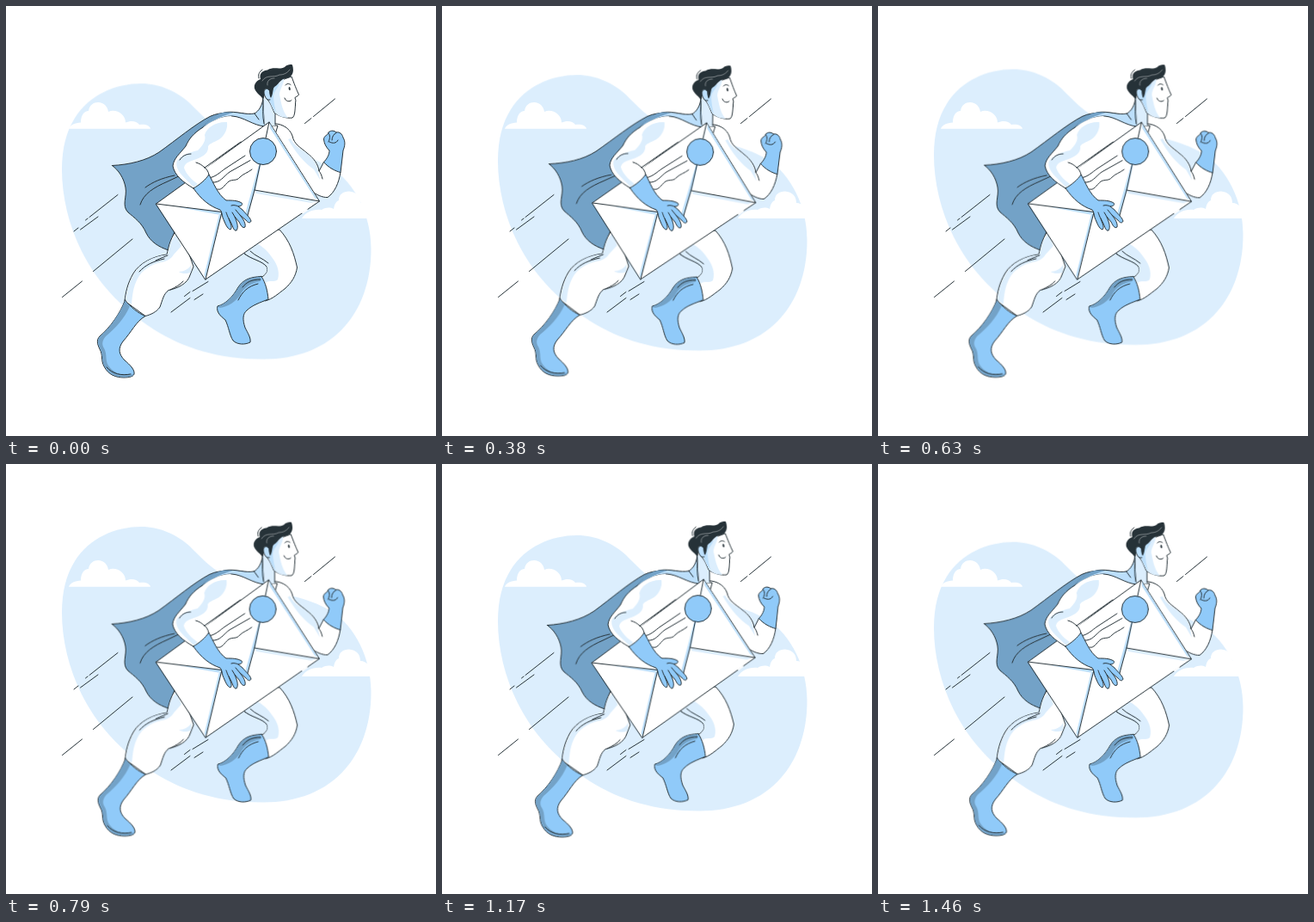
These frames come from a looping animation (500 by 500 pixels, 1500 ms). An HTML page:

```html
<!DOCTYPE html>
<html lang="en">
<head>
<meta charset="utf-8">
<title>Special delivery</title>
<style>
  html, body { margin: 0; width: 100%; height: 100%; overflow: hidden; background: #fff; }
  svg { display: block; width: 100%; height: 100%; }
  path, circle { stroke-linecap: round; stroke-linejoin: round; }
  .pale { fill: #dceefd; }
  .soft { fill: #bcdffb; }
  .blue { fill: #90caf9; }
  .deep { fill: #73a2c7; }
  .white { fill: #fff; }
  .ink { fill: #263238; }
  .line { fill: none; }
  .line, .edge { stroke: #263238; stroke-width: 1; }
  #hero { transform-origin: 249px 251px; }
</style>
</head>
<body>
<svg viewBox="0 0 500 500">
  <path id="blob" class="pale" d="M157 91C180 91 200 101 214 114C231 131 244 146 275 157C310 167 350 172 378 189C406 206 424.5 245 424.500 282C425 323 411 354 395 372C372 399 338 411.500 299 411.500C248 411.500 207 399 172 377C132 351 105 320 88 286C73 256 65 222 65 191C65 166 70 147 80 131C97 104 127 91 157 91Z"/>

  <g class="white">
    <path d="M73 142.700C75 138 80 136 87 135.500C87 127 91 122 96 122C97 115 102 112 107 112C114 112 118 117 119 123C128 119 139 126 139 135.500C146 132.500 152 134 155 138C162 137 167 139 168 142.700Z"/>
    <path d="M344 247C348 240 357 236 367 237C372 234 377 234 381 236C382 230 384 227 387 226C387 219 392 215.500 399 215.500C407 216 412 221 412 229C420 229 426 237 427 247Z"/>
  </g>

  <path class="line" d="M79 262L84 258M86.500 260L107 245M92.500 249L95 247M97 245.500L130 219.500M101.500 308.500L147 271M65.500 338.500L88.500 320M192 356L214 339.500M207.500 337.500L214 332.500M217 331.500L235 320.500M219 341.500L229 335M347.500 136.500L355 130.500M357.500 128.500L382.500 108"/>

  <g id="hero">
    <!-- cape -->
    <path class="deep edge" d="M123.500 185.500C143 184.500 163 180 178 170C199 155 219 138 237 128.500C250 122 273 123 288 128L262 160L202 222L196 262L189 284C177 280 168 274 163 264C158 252 149 246 142 240C134 232 141 222 139 211C137 200 131 191 123.500 185.500Z"/>
    <path class="line" d="M156 231C160 218 172 211 188 204L205 196M162 211C170 205 181 200 196 197"/>

    <!-- far arm -->
    <path class="white edge" d="M306 137C320 135 330 142 333 151C335 161 342 164 350 171C358 177 363 184 364 192L369.500 181.500L389 193C387 206 382 217 374 222.500C368 223 360 219 355 215L310 165Z"/>
    <path class="pale" d="M331 154C334 162 343 166 350 171.500C357 177 362 184 363 192L365 202L358 190C347 183 336 169 328 155Z"/>
    <path class="line" d="M364 192C366 194 367 197 368 201"/>
    <path class="blue edge" d="M369.500 181.500C374 177 376 172 376 168C372 164 370 160 369.500 155C370 150 374 151 375 147C378 144 382 145 384 147C388 146 391 149 392 153C395 158 394 163 392 168C391 177 390 185 389 193.500C383 192 375 188 369.500 181.500Z"/>
    <path class="line" d="M375 148C377 150 377 154 375 158M384 147.500C381 149 379 152 379 156M376 158C380 160 384 160 386 156"/>

    <!-- far leg -->
    <path class="white edge" d="M276 287C286 295 298 296 303 303C306 308 302 313 296 316L301 343C310 341 317 334 324 329C332 322 337 314 338.500 304C335 288 330 273 318 260L285 265Z"/>
    <path class="pale" d="M277 287L292 276C303 283 307 289 309 292C314 298 319 308 316 318C312 322 306 318 302 322L298 316C303 312 306 307 303 303C296 296 285 295 277 287Z"/>
    <path class="line" d="M284 285C290 291 298 293 305 299M276 287C285 295 298 296 303 303"/>
    <path class="blue edge" d="M297 314.500C284 315 276 318 270 327C264 338 255 347 246 349C244 356 250 361 255 365C259 373 260 383 264 389C269 394 278 394 284 391C285 386 281 380 278 374C275 365 275 358 280 354C286 348 295 345 305 341C304 331 302 322 297 314.500Z"/>
    <path class="deep" d="M296 315.500C284 315 276 319 270.500 327C264 338 255 347 247 349L248 351C258 350 268 344 274 333C279 325 287 322 296 320Z"/>
    <path class="line" d="M296 318C285 318 280 321 275 327M270 342C275 332 281 326 293 323"/>

    <!-- near leg -->
    <path class="white edge" d="M197 262C190 273 189 281 187 289C171 291 155 299 148 311C141 323 139 334 138 343L162 360.500C168 359 175 356 179 350C182 342 183 335 189 330.500C200 328 211 323 214 313L218 303L210 280Z"/>
    <path class="pale" d="M193 272C189 279 190 285 187 289.500C171 291 156 299 149 311C142 323 140 334 139 342L146 347C147 336 148 326 153 317C158 307 168 301 180 298C187 297 192 294 195 289L204 279L198 265ZM216 300C213 306 206 309 201 309C205 312 211 311 215 310Z"/>
    <path class="line" d="M155 309C162 301 171 297 184 294M174 296C180 293 185 291.500 188 290M191 330C197 327 203 324 206 320"/>
    <path class="blue edge" d="M138.500 342C133 357 121 374 109 384C105 388 106 393 109 399C113 406 110 412 114 419C119 429 128 432 137 432C143 432 148 431 149 428C150 423 144 417 138 412C131 405 130 398 136 390C146 379 151 367 162 360.500C153 357 145 350 138.500 342Z"/>
    <path class="deep" d="M138.500 343C132 358 121 374 109.500 384.500C106 388 107 393 110 399C113 406 111 412 115 419C120 428 129 431 137 431.500C143 431.500 148 430.500 148.500 428C137 431 126 428 119 418C115 412 118 405 114 398C111 393 112 389 116 384C128 374 138 363 144 349Z"/>
    <path class="line" d="M117 420C124 428 134 430 145 428"/>

    <!-- torso -->
    <path class="white edge" d="M262 127C276 129 289 134 301 139L316 139L310 160L240 215L225 185C222 160 236 136 262 127Z"/>
    <path class="soft edge" d="M299 107C298 116 294 122 289 125C279 127 268 122 256 123.500C244 126 235 134 229 141C240 134 251 128 263 128C277 129 287 139 301 140Z"/>
    <path class="pale" d="M299 107L308 106L313 124V139L301 140Z"/>
    <path class="deep" d="M247 125.500C252 123 258 123 264 124C254 127 241 132 229 141C234 134 240 129 247 125.500Z"/>
    <path class="line" d="M299 109C299 117 298 128 300 137M289 125L294 132M313 124V138"/>

    <!-- head -->
    <path class="white edge" d="M304 92L332 82C335 90 338 98 340.500 103C339 106 336 105 336 107C338 110 336 112 336.500 115C336 121 336 128 333 130C326 131 317 128 312 124C309 117 307 111 303 108Z"/>
    <path class="pale" d="M306 96C313 93 317 88 323 84C324 90 318 97 318 103C320 112 321 122 328 130C321 130 316 127 312.500 124C309 117 307 111 304 107Z"/>
    <path class="soft" d="M309 95C313 93 316 91 318 90C317 95 312 98 311 104C311 112 313 119 314 125C310 118 307 112 305 107Z"/>
    <path class="ink" d="M289 96C288 91 291 87 296 85C294 79 298 75 304 74.500C311 70 318 74.500 324 71C327 68 331 67.500 333 68.500C335 75 334 81 328 83.500C323 84 320 86 317.500 89C315 93 312 93 311 96C310 100 310 104 308 107C306 104 306 101 305 98C302 95 300 97 300 101C301 104 300 107 299 109C297 104 291 102 289 96Z"/>
    <path class="soft edge" d="M306 98C303 94 300 97 300 101C301 106 303 110 307 109"/>
    <path class="line" d="M294 84C293 80 294 77 298 74M325 92C326.500 90 329 90 331 91.500M324 107C325 111 330 112 332 109.500" stroke-width="1.200"/>
    <path d="M298 87C303 79 311 84 318 80C323 80 327 78 330 74M304 92C303 87 307 84 312 84" fill="none" stroke="#fff" stroke-width=".4"/>
    <path class="ink" d="M329 94C330.500 94 331 96 330.500 98C329 98.500 328 96 329 94Z"/>

    <!-- envelope -->
    <path class="white edge" d="M174.500 230L306 135L364.500 227L232 318Z"/>
    <path class="soft" d="M196 233L251 239.500L247 242.500ZM250.500 242L248 241.500L230.500 313L232 317ZM307 137L363 226L359 223L307 142ZM303 153L306.500 138L290.500 212L280 246L277.500 244Z"/>
    <path class="pale" d="M290 214.500L361 227L355 229L291 218Z"/>
    <path class="line" d="M174.500 230L251 239.500L232 318M306 135L289 214L364.500 227M289 214L280 247"/>
    <path class="line" d="M234 200C243 200 249 193 255 189L278 174M240 205C249 206 253 198 260 193L284 179.500M246 213C251 215 254 208 259 204C264 201 268 204 272 199C276 195 281 194 286 190"/>
    <path d="M345 240.400L350 237" stroke="#fff" stroke-width="1.800"/>
    <circle class="blue edge" cx="299" cy="169" r="15.500"/>

    <!-- near arm -->
    <path class="white" d="M228 142C218 148 213 154 209 163C202 172 195 177 194 186C196 197 206 205 218 212L236 196L232 189L256 170L268 150L262 128C249 128 237 135 228 142Z"/>
    <path class="pale" d="M257 135C245 134 233 141 231 150C233 156 229 162 223 168C213 170 204 174 199 180C197 184 199 190 203 195C209 202 214 206 219 211L223 207C216 202 209 195 207 188C208 181 217 180 224 177C231 174 235 170 235 165C234 160 242 159 248 155C255 150 258 142 257 135Z"/>
    <path class="line" d="M229 141C218 148 213 154 209 163C202 172 195 177 194 186C196 197 206 205 218 212M236 196C235 192 233 189 231 188C228 185 225 183 221 182M231 188L256 170M202 179C205 174 210 172 215 172M256 170L273 158"/>
    <path class="blue edge" d="M218 212C225 208 232 202 236 196C241 205 246 219 256 226C263 226 269 226 274 229C276 231 273 233 270 233L275 237C279 242 284 246 285 250C284 253 281 252 279 249L272 243C276 248 279 253 278 257C275 259 273 255 271 251L266 245C268 250 271 257 268 261C265 262 264 257 262 253L259 247C260 251 264 257 261 260C257 259 255 253 252 246C251 242 251 239 249 237C237 233 227 225 218 212Z"/>
    <path class="line" d="M262 232C265 231 268 232 270 233M259 247C257 244 257 242 256 240M266 245L263 240M272 243L267 237"/>
  </g>
</svg>
<script>
  const LOOP = 1500, FRAMES = 36, LEAD = 30;

  // Linear swing from 1 to -1 and back, peaking at `peak` ms.
  const swing = (t, peak) => {
    const p = (((t - peak) / LOOP) % 1 + 1) % 1;
    return Math.abs(p * 4 - 2) - 1;
  };

  // Plays a pose function at 24 held steps per second.
  const play = (id, pose) => {
    const keys = Array.from({ length: FRAMES + 1 }, (_, i) => ({
      offset: Math.round(i * 25 / 6) * 10 / LOOP,
      transform: pose(i * LOOP / FRAMES + LEAD),
      easing: 'step-end'
    }));
    document.getElementById(id).animate(keys, { duration: LOOP, iterations: Infinity });
  };

  play('blob', t => `translateY(${10 * swing(t, 0) - 10}px)`);
  play('hero', t => `rotate(${swing(t, LOOP / 4) - .08}deg)`);
</script>
</body>
</html>
```
